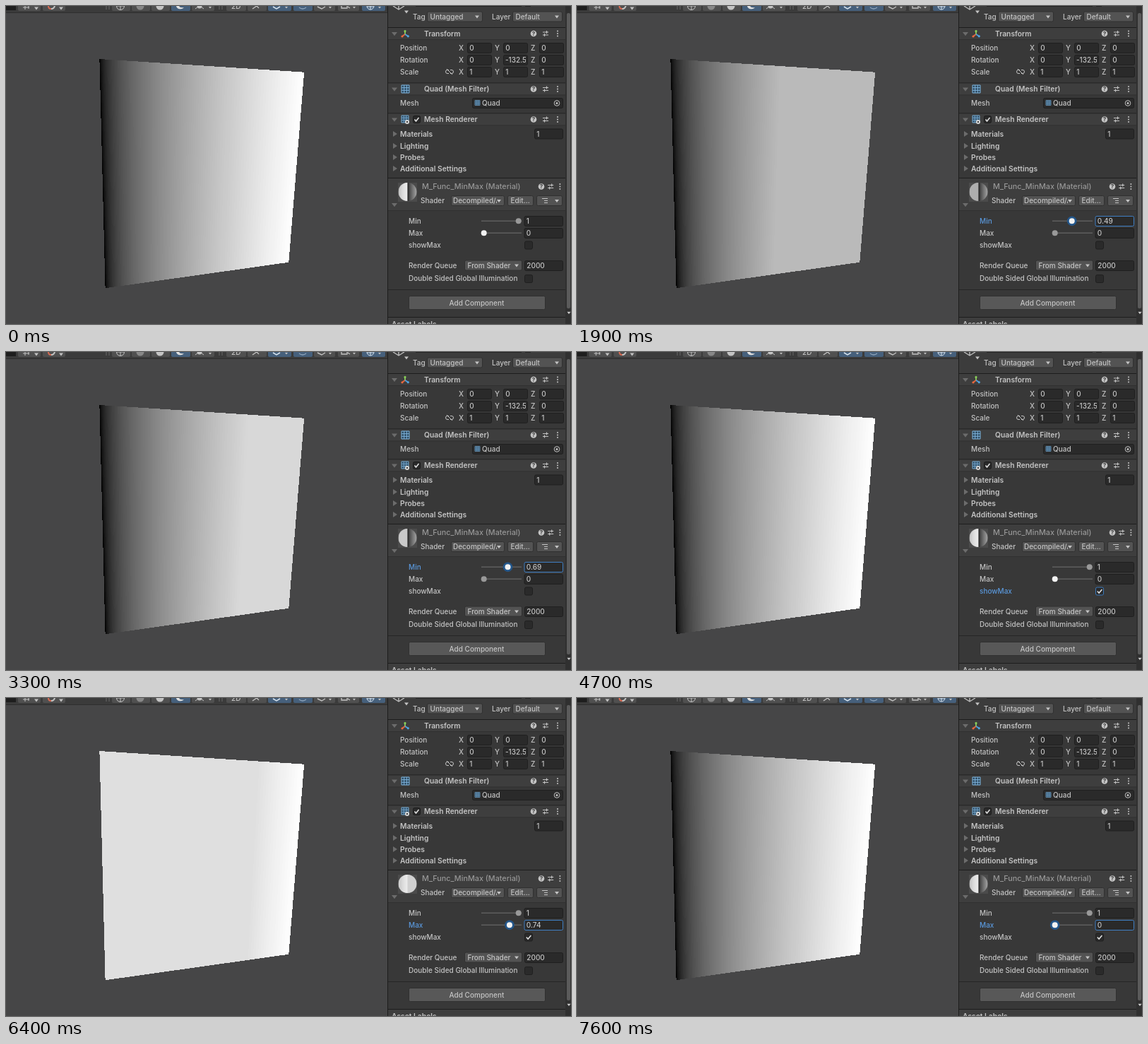
An HTML page that plays this animation: 800x450 px, repeating every 7900 ms.

```html
<!DOCTYPE html>
<html lang="en">
<head>
<meta charset="utf-8">
<title>Min / Max shader</title>
<style>
  html, body { margin: 0; width: 100%; height: 100%; overflow: hidden; background: #464647; }
  svg { display: block; width: 800px; height: 450px; }
  text { font: 500 10px Inter, sans-serif; fill: #c4c4c4; white-space: pre; }
  .bold { font-weight: 600; font-size: 10.3px; }
  .crisp { shape-rendering: crispEdges; }
</style>
</head>
<body>
<svg id="stage" viewBox="0 0 800 450" xmlns="http://www.w3.org/2000/svg">
  <defs>
    <clipPath id="ball"><circle cx="568.5" cy="263" r="13"/></clipPath>
    <clipPath id="rotation"><rect x="705" y="69" width="31" height="15"/></clipPath>
    <clipPath id="shader"><rect x="630" y="268" width="65" height="15"/></clipPath>
  </defs>
  <rect width="800" height="450" fill="#464647"/>
  <g id="toolbar"></g>
  <g id="quad" class="crisp"></g>
  <g id="panel"></g>
  <g id="preview" clip-path="url(#ball)"></g>
  <g id="controls"></g>
</svg>
<script>
const LOOP = 7900, STEP = 100;
const $ = id => document.getElementById(id);

// --- markup helpers; text and icons are placed by their vertical centre
const rect = (x, y, w, h, fill, extra = '') =>
  `<rect x="${x}" y="${y}" width="${w}" height="${h}" fill="${fill}" ${extra}/>`;
const path = (d, stroke, width = 1, fill = 'none') =>
  `<path d="${d}" stroke="${stroke}" stroke-width="${width}" fill="${fill}"/>`;
const circle = (x, y, r, fill, extra = '') => `<circle cx="${x}" cy="${y}" r="${r}" fill="${fill}" ${extra}/>`;
const label = (x, y, s, extra = '') => `<text x="${x}" y="${y + 3.6}" ${extra}>${s}</text>`;
const bold = (x, y, s) => label(x, y, s, 'class="bold"');
const box = (x, y, w, h, fill, stroke) =>
  rect(x + .5, y + .5, w - 1, h - 1, fill, `rx="2" stroke="${stroke}"`);
const field = (x, y, w, s = '', stroke = '#1f1f1f') =>
  box(x, y - 7.5, w, 15, '#2a2a2a', stroke) + label(x + 3.3, y, s);
const button = (x, y, w, s = '', h = 15) => box(x, y - h / 2, w, h, '#535353', '#303030') + label(x + 4.5, y, s);
const down = (x, y, size = 3, fill = '#c4c4c4') =>
  path(`M${x - size} ${y - size / 2}h${2 * size}l${-size} ${size * 1.3}z`, 'none', 0, fill);
const dropdown = (x, y, w, s) => button(x, y, w, s) + down(x + w - 8, y);
const foldOpen = y => down(550, y, 4, '#6c6c6c');
const foldClosed = y => path(`M548 ${y - 4}l6 4l-6 4z`, 'none', 0, '#6c6c6c');
const checkbox = (y, on, focus) =>
  box(734, y - 6, 12, 12, '#2a2a2a', focus ? '#3a79bb' : '#1f1f1f') +
  (on ? path(`M736.8 ${y}l2.3 2.6l4.3 -5.2`, '#e2e2e2', 1.5) : '');
const grid = (x, y, s) => {
  const k = s / 3;
  let d = `M${x} ${y}h${s}v${s}h${-s}z`;
  for (const i of [1, 2]) d += `M${x + k * i} ${y}v${s}M${x} ${y + k * i}h${s}`;
  return path(d, '#7db3dc', s / 11, '#2d4a60');
};
const headerIcons = (y, x = 747, gap = 17) => {
  const a = x + gap, b = x + 2 * gap;
  return circle(x, y, 4.3, '#c4c4c4') +
    `<text x="${x}" y="${y + 2.8}" text-anchor="middle" style="font-size:8px;font-weight:700;fill:#3a3a3a">?</text>` +
    path(`M${a - 4} ${y - 2}h8M${a - 4} ${y + 2}h8M${a + 1.5} ${y - 4}v4M${a - 1.5} ${y}v4`, '#c4c4c4', 1.2) +
    [-3.5, 0, 3.5].map(d => circle(b, y + d, 1, '#c4c4c4')).join('');
};
const header = (y, title, icon) =>
  rect(541, y - 9, 251, 1, '#1d1d1d') + rect(541, y - 8, 251, 16, '#3e3e3e') + rect(541, y + 8, 251, 1, '#303030') +
  foldOpen(y) + icon + bold(592, y, title) + headerIcons(y);

function drawToolbar() {
  const c = '#c4c4c4', ring = (x, r = 5.5) => circle(x, 0, r, 'none', `stroke="${c}"`);
  const on = (x, w) => rect(x, -4, w, 11, '#46607c', 'rx="2"');
  const off = (x, w) => rect(x, -4, w, 11, '#505050', 'rx="2"');
  let s = rect(0, 0, 540, 9, '#3b3b3b') + rect(0, 9, 540, 1, '#2e2e2e');
  s += rect(0, 0, 14, 6, '#1e1e1e') + off(17, 32) + off(52, 32) + off(150, 26) + off(178, 26) + off(206, 26);
  s += on(234, 27) + off(263, 32) + off(312, 28) + off(342, 27) + on(371, 33) + on(407, 27) + off(436, 30) + off(470, 30) + on(504, 33);
  s += path('M24 2h9M27 0v5M32 0v4', c) + down(43, 3) + path('M60 0q0 4 4 4', '#d66a52', 2) +
    path('M64 4q4 0 5 -4', c, 2) + down(78, 3);
  s += path('M142 0v5M146 0v5M302 0v5M306 0v5', '#686868');
  s += ring(162) + path('M157 0h10M162 -4v9', c) + circle(190, 0, 5.5, '#888') + circle(218, 0, 5.5, c);
  s += path('M241 0a6 5 0 0 0 11 2q-7 1 -7 -3z', 'none', 0, '#e0e0e0');
  s += circle(274, 0, 3.5, c) + path('M268 4l4 -3M280 4l-4 -3', c) + down(289, 2, 2);
  s += label(319, 0, '2D') + path('M349 4l6 -4l3 3', c, 1.3);
  s += path('M378 1l5 3l5 -3', '#d8e4ef', 1.5) + down(397, 2, 2);
  s += path('M415 2q5 4 10 0', '#8fa6bd', 1.3) + path('M441 1l6 3l5 -3', c, 1.4) + down(459, 2, 2);
  s += path('M475 0v3h8v-3M484 1l3 2', c, 1.3) + down(493, 2, 2);
  s += circle(516, 0, 5, 'none', 'stroke="#d8e4ef"') + path('M511 1h10M516 0v5', '#d8e4ef') + down(529, 2, 2);
  $('toolbar').innerHTML = s;
}

function drawPanel() {
  let s = rect(540, 0, 1, 450, '#1d1d1d') + rect(541, 0, 259, 450, '#383838') + rect(541, 0, 251, 30, '#3c3c3c');
  s += rect(792, 0, 8, 450, '#303030') + rect(794, 10, 5, 418, '#5b5b5b', 'rx="2"') + down(797, 434, 2.5, '#d0d0d0');
  s += path('M548 0l8 5l8 -5M556 0v5', '#bdbdbd', 1.4) + down(567, 8, 3) +
    rect(580, 0, 150, 1, '#222') + rect(735, 0, 8, 1, '#222');
  s += label(576, 15, 'Tag') + dropdown(596, 15, 79, 'Untagged') + label(688, 15, 'Layer') + dropdown(717, 15, 71, 'Default');

  const axes = path('M565 40v-4.5', '#8bd15a', 1.8) + path('M565 40l-3.5 2.5', '#e8683f', 1.8) +
    path('M565 40l4 2.5', '#4fa3e0', 1.8) +
    circle(565, 35.5, 1.6, '#8bd15a') + circle(561, 43, 1.6, '#e8683f') + circle(569.3, 42.8, 1.6, '#4fa3e0');
  s += header(39, 'Transform', axes);
  [['Position', '0', '0', '0'], ['Rotation', '0', '', '0'], ['Scale', '1', '1', '1']].forEach(([name, ...values], i) => {
    const y = 59.5 + 17 * i;
    s += label(558, y, name);
    values.forEach((v, k) => s += label(641 + 51 * k, y, 'XYZ'[k]) + field(653 + 51 * k, y, 35, v));
  });
  s += `<g clip-path="url(#rotation)">${label(707, 76.5, '-132.57')}</g>`;
  s += path('M627 90.5h-2a2.5 2.5 0 0 0 0 5h2M629 90.5h2a2.5 2.5 0 0 1 0 5h-2M624 89l8 8', '#c4c4c4');

  s += header(117.5, 'Quad (Mesh Filter)', grid(560, 112, 11));
  s += label(558, 137.5, 'Mesh') + field(660, 137.5, 129) + grid(664, 133.5, 7) + label(674, 137.5, 'Quad') +
    circle(780, 137.5, 3.8, 'none', 'stroke="#c4c4c4"') + circle(780, 137.5, 1.5, '#c4c4c4');

  s += header(160.5, 'Mesh Renderer', grid(560, 155, 10) + circle(568, 164, 3, '#d9d9d9') + circle(568, 164, 1.2, '#444') +
    box(576, 155, 11, 11, '#2a2a2a', '#1b1b1b') + path('M578.5 160.5l2 2.5l4 -5', '#e2e2e2', 1.5));
  ['Materials', 'Lighting', 'Probes', 'Additional Settings'].forEach((name, i) => {
    const y = [181, 198, 214, 230][i];
    s += foldClosed(y) + bold(558, y, name);
  });
  s += field(748, 181, 41, '1');

  s += rect(541, 243, 251, 1, '#1d1d1d') + rect(541, 244, 251, 45, '#3e3e3e') + rect(541, 289, 251, 1, '#303030');
  s += rect(555, 250, 27, 27, '#4b4b4b') + foldOpen(281);
  s += label(589, 255.5, 'M_Func_MinMax (Material)', 'style="font-size:10.8px;fill:#969696"') + headerIcons(255.5, 758, 13.2);
  s += label(587, 275.5, 'Shader') + dropdown(630, 275.5, 76, '') +
    `<g clip-path="url(#shader)">${label(633, 275.5, 'Decompiled/A')}</g>` +
    button(710, 275.5, 37, 'Edit...') + dropdown(751, 275.5, 37, '') +
    path('M759 272.5h8M762 275.5h5M762 278.5h5', '#c4c4c4', 1.2);

  s += label(570, 367, 'Render Queue') + dropdown(649, 367, 82, 'From Shader') + field(734, 367.5, 55, '2000');
  s += label(570, 385.5, 'Double Sided Global Illumination') + checkbox(386);
  s += rect(541, 401, 251, 1, '#262626') + box(570, 410, 194, 20, '#585858', '#303030') +
    label(666.5, 420, 'Add Component', 'text-anchor="middle"');
  s += rect(541, 440, 251, 1, '#1d1d1d') + rect(541, 441, 251, 9, '#3e3e3e') + bold(546, 450.5, 'Asset Labels');
  $('panel').innerHTML = s;
}

// --- shaded surfaces: strips that each carry one horizontal texture coordinate
const STRIPS = 128;
const surfaces = [];
const along = (a, b, u, depth) => a + (b - a) * depth * u / (1 + (depth - 1) * u);

function buildSurfaces() {
  const add = (parent, tag, attrs, u) => {
    const el = document.createElementNS('http://www.w3.org/2000/svg', tag);
    for (const k in attrs) el.setAttribute(k, attrs[k]);
    $(parent).append(el);
    surfaces.push({ el, u });
  };
  const uAt = i => (i / STRIPS) ** 2.2;
  for (let i = 0; i < STRIPS; i++) {
    const u = uAt(i);
    const top = [along(132.4, 422.2, u, 1.2225), along(75, 93.7, u, 1.2225)];
    const bottom = [along(140.6, 400.3, u, 1.196), along(399.3, 362.7, u, 1.196)];
    add('quad', 'polygon', { points: `${top} 422.2,93.7 400.3,362.7 ${bottom}` }, uAt(i + .5));
  }
  for (let x = -13; x < 13; x++) {
    const lon = Math.asin((x + .5) / 13) / Math.PI;
    add('preview', 'rect', { x: 568.5 + x, y: 250, width: 1.3, height: 26 }, lon < 0 ? lon + 1 : lon);
  }
}

const grey = u => {
  const v = Math.round(255 * (u <= .0031308 ? 12.92 * u : 1.055 * u ** (1 / 2.4) - .055));
  return `rgb(${v},${v},${v})`;
};

// --- timeline
const MIN_KEYS = [[800, 1], [1400, .62], [1600, .61], [2400, .28], [2600, .19], [2800, .28], [3200, .64], [3900, 1]];
const MAX_KEYS = [[5100, 0], [5600, .28], [6000, .59], [6300, .77], [6400, .74], [7000, .32], [7500, 0]];

function valueAt(keys, t) {
  if (t <= keys[0][0]) return keys[0][1];
  const i = keys.findIndex(k => k[0] >= t);
  if (i < 0) return keys[keys.length - 1][1];
  const [t0, v0] = keys[i - 1], [t1, v1] = keys[i];
  return Math.round(100 * (v0 + (v1 - v0) * (t - t0) / (t1 - t0))) / 100;
}

const property = (y, name, focus) => label(570, y, name, focus ? 'style="fill:#5a98dc"' : '');
function slider(y, name, value, focus, bright) {
  const x = 676.7 + 49 * value;
  return property(y, name, focus) + rect(673, y - 1, 57, 1.5, '#5e5e5e') +
    (focus ? circle(x, y - .3, 6.8, '#23568a') : '') +
    circle(x, y - .3, 4, focus || bright ? '#f2f2f2' : '#999') +
    field(733.5, y, 55.5, String(value), focus ? '#3f7fc4' : undefined);
}

function render(t) {
  const min = valueAt(MIN_KEYS, t), max = valueAt(MAX_KEYS, t);
  const focus = t < 500 ? '' : t < 4400 ? 'min' : t < 5200 ? 'show' : 'max';
  for (const { el, u } of surfaces) el.setAttribute('fill', grey(Math.max(max, Math.min(min, u))));
  $('controls').innerHTML =
    slider(304.5, 'Min', min, focus === 'min') +
    slider(321.5, 'Max', max, focus === 'max', t < 200 || t >= 4400) +
    property(338.5, 'showMax', focus === 'show') + checkbox(338.5, t >= 4600, focus === 'show');
}

drawToolbar();
drawPanel();
buildSurfaces();

let start, shown = -1;
function tick(now) {
  start ??= now;
  const t = Math.floor(((now - start) % LOOP) / STEP) * STEP;
  if (t !== shown) render(shown = t);
  requestAnimationFrame(tick);
}
render(0);
requestAnimationFrame(tick);
</script>
</body>
</html>
```
